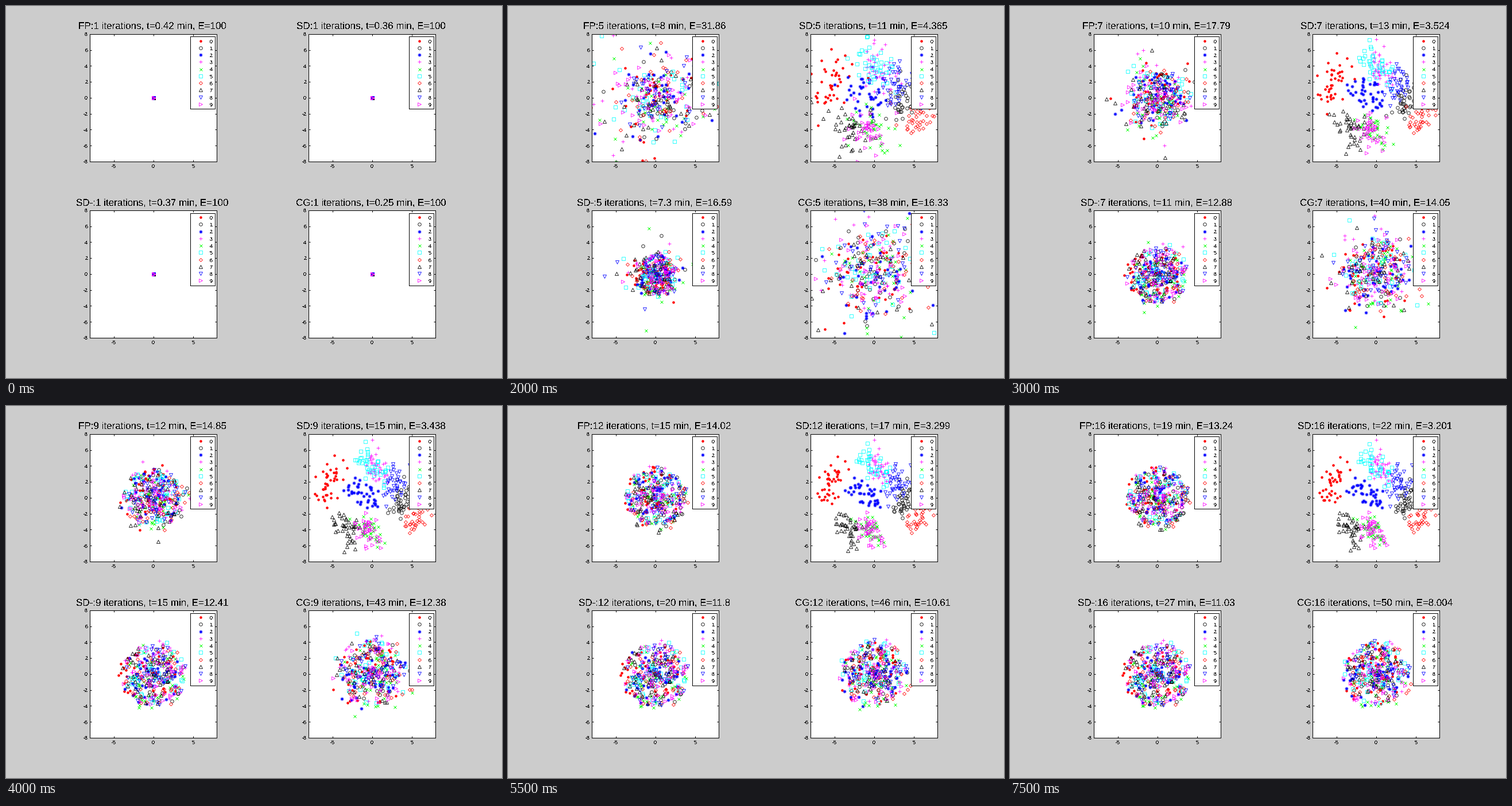
Write a matplotlib script that moves like this. It is 864 by 648 pixels and loops after 8000 ms.

```python
import numpy as np
import matplotlib.pyplot as plt
from matplotlib.animation import FuncAnimation
from matplotlib.patches import Rectangle

W, H, DPI = 864, 648, 72
STEPS, PER_CLASS = 16, 40

plt.rcParams.update({
    "font.family": "Liberation Sans",
    "axes.unicode_minus": False,
    "axes.linewidth": 1,
    "text.antialiased": False,
    "text.hinting": "none",
})

MARKERS = [".", "o", (8, 2, 0), "+", "x", "s", "D", "^", "v", ">"]
COLOURS = ["red", "black", "blue", "magenta", "lime", "cyan"]
SIZES = {".": 9, "D": 4.2, "x": 5}

# where each digit gathers: centre x, y and heading in degrees
CLUSTERS = [(-5.2, 2.3, 65), (3.8, 0.2, 65), (-0.9, 0.5, -40),
            (0.3, 4.1, -75), (-0.6, -4.0, -40), (0, 4.1, -45),
            (5.6, -2.5, 65), (-3.4, -3.9, -60), (2.9, 1.9, 65),
            (-0.4, -4.1, -55)]

# iterations at which minutes and energy are pinned
T_KNOTS = [1, 5, 12, 16]
E_KNOTS = [1, 5, 7, 9, 12, 14, 16]

# size: final radius and rise time; burst: peak scatter and decay time
PANELS = [
    dict(name="FP", x=146, y=48, t=[0.42, 8, 15, 19],
         e=[100, 31.86, 17.79, 14.85, 14.02, 13.63, 13.24],
         size=(3.8, 4.5), burst=(5.8, 2.3), power=1),
    dict(name="SD", x=527, y=48, t=[0.36, 11, 17.4, 22],
         e=[100, 4.365, 3.524, 3.438, 3.299, 3.231, 3.201],
         size=(1, 2), burst=(1.8, 3), power=1),
    dict(name="SD-", x=146, y=355.5, t=[0.37, 7.3, 20, 26.8],
         e=[100, 16.59, 12.88, 12.41, 11.8, 11.42, 11.03],
         size=(4.1, 4), burst=(0.25, 1.5), power=3),
    dict(name="CG", x=527, y=355.5, t=[0.25, 38, 46, 50],
         e=[100, 16.33, 14.05, 12.38, 10.61, 9.243, 8.004],
         size=(4.2, 2.5), burst=(4.5, 2.8), power=1),
]

rng = np.random.default_rng(12)
shape = (len(MARKERS), PER_CLASS, 2)
place = np.array(CLUSTERS)
centre = place[:, None, :2]


def polar(r, angle):
    return np.stack([r * np.cos(angle), r * np.sin(angle)], axis=-1)


def organised():
    """Points strewn along a short segment for each digit."""
    along = rng.uniform(-2, 2, shape[:2])
    heading = np.radians(place[:, 2:])
    return centre + polar(along, heading) + rng.normal(0, 0.7, shape).clip(-1.4, 1.4)


def disc():
    """Unit disc, denser in the middle, digits pulled slightly apart."""
    r = rng.random(shape[:2]) ** 0.65
    return polar(r, rng.uniform(0, 2 * np.pi, shape[:2])) + 0.02 * centre


def scatter(power):
    z = rng.normal(size=shape)
    return z ** 3 if power == 3 else z * rng.random(shape[:2] + (1,))


def positions(p, k):
    radius, rise = p["size"]
    peak, decay = p["burst"]
    size = radius * (1 - np.exp(-((k - 1) / rise) ** 2))
    spread = peak * min((k - 1) / 4, 1) ** 2 * np.exp(-max(k - 5, 0) / decay)
    return p["base"] * size + p["noise"] * spread


def title(p, k):
    t = np.interp(k, T_KNOTS, p["t"])
    e = np.exp(np.interp(k, E_KNOTS, np.log(p["e"])))
    return f"{p['name']}:{k} iterations, t={t:.2g} min, E={e:.4g}"


def markers(ax, i, x, y, **kw):
    marker, colour = MARKERS[i], COLOURS[i % len(COLOURS)]
    dot = marker == "."
    line, = ax.plot(x, y, ls="", marker=marker, ms=SIZES.get(marker, 5.5),
                    mfc=colour if dot else "none",
                    mec="none" if dot else colour,
                    mew=0.8, antialiased=False, **kw)
    return line


def build_axes(p):
    left, bottom = p["x"] + 0.1, H - 1 - (int(p["y"]) + 222) + 0.1
    ax = fig.add_axes([left / W, bottom / H, 221 / W, 222 / H])
    ax.set(xlim=(-8, 8), ylim=(-8, 8), xticks=[-5, 0, 5],
           yticks=range(-8, 9, 2))
    ax.tick_params(direction="in", length=3, width=1, pad=4, top=True,
                   right=True, labelsize=9)
    for spine in ax.spines.values():
        spine.set_antialiased(False)
    return ax


def build_legend(p):
    x, y = p["x"], p["y"]
    top.add_patch(Rectangle((x + 175.1, y + 5.3), 43, 126, fc="white",
                            ec="black", lw=1, antialiased=False, zorder=1))
    for i in range(len(MARKERS)):
        row = y + 12.7 + 12.25 * i
        markers(top, i, [x + 192.7], [row], zorder=2)
        top.text(x + 211.5, row + 0.5, str(i), size=9, ha="center",
                 va="center_baseline", zorder=3)


fig = plt.figure(figsize=(W / DPI, H / DPI), dpi=DPI, facecolor="#cccccc")

for p in PANELS:
    p["ax"] = build_axes(p)
    p["base"] = organised() if p["name"] == "SD" else disc()
    p["noise"] = scatter(p["power"])
    p["lines"] = [markers(p["ax"], i, [], []) for i in range(len(MARKERS))]

# overlay in pixel coordinates for titles and legends
top = fig.add_axes([0, 0, 1, 1], zorder=5)
top.set(xlim=(0, W), ylim=(H, 0))
top.axis("off")

for p in PANELS:
    build_legend(p)
    p["title"] = top.text(p["x"] + 109, p["y"] - 8, "", size=17,
                          ha="center", va="baseline")


def update(frame):
    k = frame + 1
    for p in PANELS:
        p["title"].set_text(title(p, k))
        for line, pts in zip(p["lines"], positions(p, k)):
            line.set_data(pts[:, 0], pts[:, 1])
    return []


anim = FuncAnimation(fig, update, frames=STEPS, interval=500, repeat=True,
                     repeat_delay=0, blit=False)
plt.show()
```
